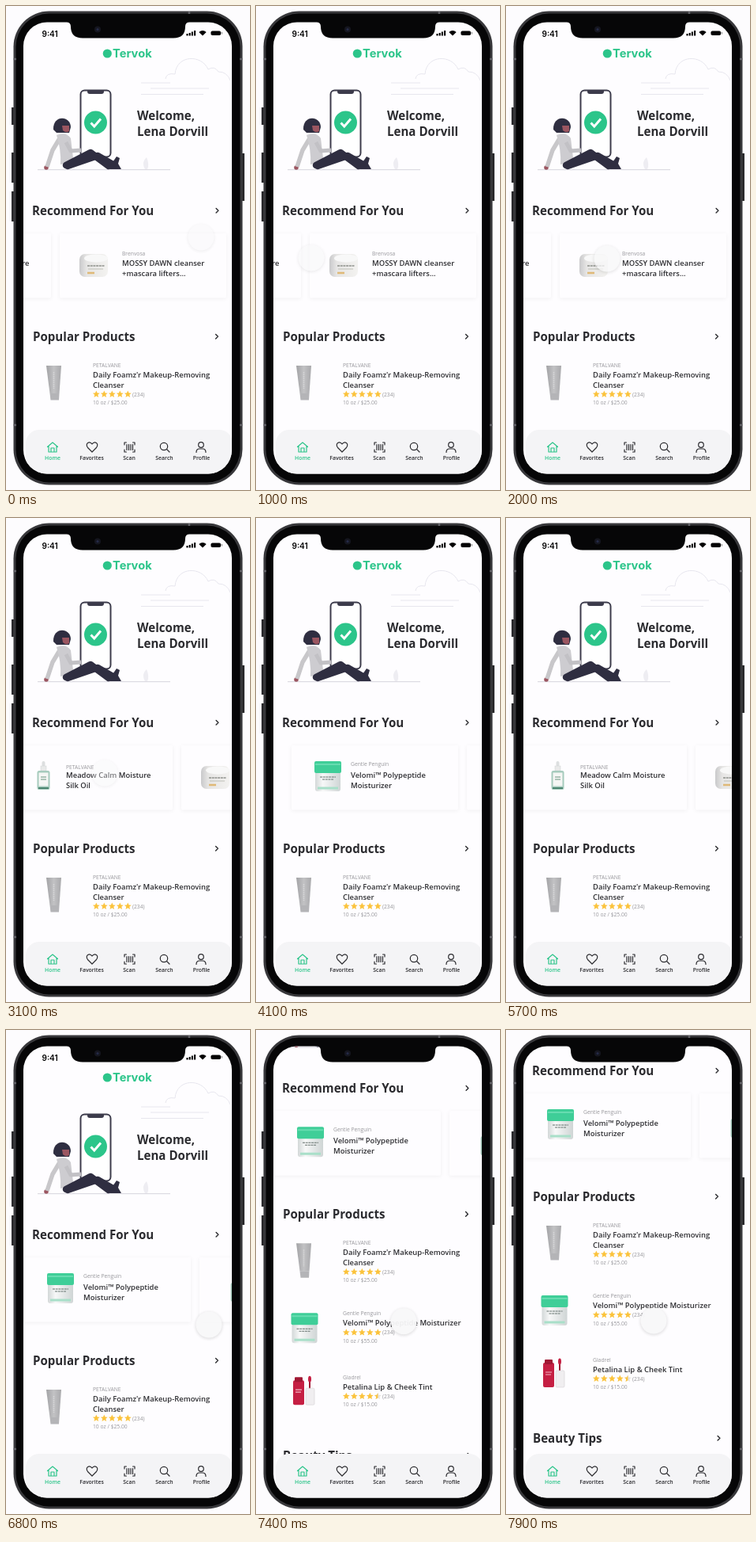
An HTML page that plays this animation: 309 px wide and 611 px high, repeating every 8000 ms.

```html
<!DOCTYPE html>
<html lang="en">
<head>
<meta charset="utf-8">
<title>Beauty shop app</title>
<style>
  html, body { margin: 0; height: 100%; overflow: hidden; background: #fdfcfe; }
  svg { display: block; width: 100vw; height: 100vh; font-family: "Open Sans", sans-serif; }
  .h { font-size: 15.1px; font-weight: 700; fill: #2b2b2f; }
  .title { font-size: 9.45px; font-weight: 600; fill: #2e2e32; }
  .small { font-size: 6.75px; fill: #98989c; }
  .label { font-size: 6.9px; font-weight: 600; text-anchor: middle; fill: #2b2b2f; }
  .line { fill: none; stroke: #2b2b2f; stroke-width: 1.2; stroke-linecap: round; stroke-linejoin: round; }
  .card { fill: #fefdff; filter: drop-shadow(0 1.5px 2.5px rgba(0,0,0,.055)); }
  #touch { filter: drop-shadow(0 1.5px 2px rgba(0,0,0,.16)); }
</style>
</head>
<body>
<svg viewBox="0 0 309 611">
  <defs>
    <clipPath id="screen"><rect x="22" y="20.5" width="264" height="570" rx="30"/></clipPath>
    <clipPath id="half"><rect x="-5" y="-5" width="5" height="10"/></clipPath>
    <linearGradient id="metal">
      <stop offset="0" stop-color="#a2a2a5"/><stop offset=".5" stop-color="#c2c2c4"/><stop offset="1" stop-color="#a9a9ac"/>
    </linearGradient>
    <linearGradient id="glass">
      <stop offset="0" stop-color="#d3d8d8"/><stop offset=".3" stop-color="#f7f8f8"/><stop offset="1" stop-color="#cfd5d5"/>
    </linearGradient>
    <linearGradient id="cream">
      <stop offset="0" stop-color="#c9c9cb"/><stop offset=".25" stop-color="#e6e5e4"/><stop offset="1" stop-color="#f3f2f0"/>
    </linearGradient>
    <path id="star" d="M0-4.5 1.3-1.5 4.4-1.3 2 .8 2.8 3.9 0 2.2-2.8 3.9-2 .8-4.4-1.3-1.3-1.5Z"/>
    <path id="chevron" class="line" style="stroke-width:1.4" d="M-1.4-2.8 1.4 0-1.4 2.8"/>

    <g id="tube">
      <path d="M0 0H19L16.5 35H4.5Z" fill="url(#metal)"/>
      <path d="M4.5 35H16.5L16 43.5H5.500Z" fill="#b4b4b7"/>
      <path d="M9.500 8V29" stroke="#d8d8da" stroke-width="1.5" stroke-dasharray="1.5 1"/>
    </g>
    <g id="jar">
      <rect x="1" y="13" width="32" height="25" rx="3" fill="url(#glass)"/>
      <rect y="0" width="34" height="15" rx="2" fill="#3fce98"/>
      <path d="M1 4H33" stroke="#66dcb0" stroke-width="2"/>
      <path d="M7 20H27M10 23H24" stroke="#65726e" stroke-width="1.1" stroke-dasharray="3 .7"/>
      <path d="M4 34H30" stroke="#a9dfc9" stroke-width="3"/>
    </g>
    <g id="dropper">
      <rect x="6.500" y="0" width="4" height="7" rx="2" fill="#dddfe0"/>
      <rect x="5" y="6" width="7" height="6" fill="#e9eaea" stroke="#ced2d2" stroke-width=".5"/>
      <rect x=".5" y="12" width="16" height="24" rx="2.500" fill="#a6cbbd"/>
      <rect x="2.500" y="14.500" width="12" height="17" fill="#f5f6f4"/>
      <path d="M5 20H12M5 23H12" stroke="#69937f"/>
      <path d="M2 34H15" stroke="#4c8570" stroke-width="2"/>
    </g>
    <g id="tub">
      <rect y="1" width="36" height="29" rx="7" fill="url(#cream)"/>
      <ellipse cx="21" cy="6.500" rx="15" ry="5" fill="#f8f8f8"/>
      <path d="M10 16H32" stroke="#8f918c" stroke-width="1.6" stroke-dasharray="3 .7"/>
      <path d="M11 20H30" stroke="#bfc0b8"/>
      <path d="M10 25H19" stroke="#dfb977" stroke-width="2.500"/>
    </g>
    <g id="tint">
      <rect x="1" y="5" width="14" height="31" rx="2" fill="#c51f43"/>
      <rect x="3" y="1" width="10" height="6" rx="1" fill="#a01834"/>
      <path d="M4 17H12M4 20H11" stroke="#f2b8c4" stroke-width="1.2"/>
      <path d="M22 1V18" stroke="#a01834" stroke-width="2"/>
      <ellipse cx="22" cy="3.5" rx="2" ry="4" fill="#c51f43"/>
      <rect x="17" y="15" width="11" height="21" rx="1.5" fill="#f0eef0" stroke="#d3d0d4" stroke-width=".6"/>
    </g>
  </defs>

  <!-- phone body -->
  <path d="M8.500 128V150M8.500 185V223M8.500 234V272M300.500 186V246" stroke="#29292c" stroke-width="3"/>
  <rect x="9.500" y="6.500" width="290" height="598" rx="45" fill="#38383b"/>
  <rect x="12.500" y="9.500" width="284" height="592" rx="42" fill="#060607"/>
  <path d="M9.500 67H13M9.500 529H13M296 67H299.500M296 529H299.500M232 7V10" stroke="#626267" stroke-width="2.5"/>

  <g clip-path="url(#screen)">
    <rect x="20" y="20" width="268" height="572" fill="#fefdff"/>
    <g id="page">
      <!-- status bar -->
      <text x="45.5" y="39.3" font-family="Inter, sans-serif" font-size="10" font-weight="600">9:41</text>
      <path d="M229.5 37.5V35M232.7 37.5V34M235.9 37.5V32.500M239.1 37.5V31" stroke="#000" stroke-width="2.1"/>
      <path d="M249 37.5 244.300 33Q249 29 253.700 33Z"/>
      <rect x="259.5" y="31.500" width="12.5" height="5.500" rx="1.800"/><path d="M273.3 33V35.5" stroke="#777"/>

      <circle cx="128.3" cy="60" r="5.6" fill="#2cc58a"/>
      <text x="135" y="65" font-family="Inter, sans-serif" font-size="14.7" font-weight="700" fill="#2cc58a">Tervok</text>

      <!-- clouds -->
      <path d="M202 92Q203 84 214 86C216 61 248 61 256 80Q264 75 269 83Q280 83 284 94M171 97H208M183 104H257M171 111.5H250" fill="none" stroke="#e7e6ee"/>

      <!-- welcome drawing -->
      <path d="M40 206.7H208" stroke="#d5d4dc"/>
      <path d="M176 206Q171 197 178 191Q182 200 179 206Z" fill="#eeedf2"/>
      <rect x="94.5" y="106.5" width="38" height="84" rx="5" fill="#fff" stroke="#3c3b4b" stroke-width="2"/>
      <path d="M103 106H124V108Q124 111 121 111H106Q103 111 103 108Z" fill="#3c3b4b"/>
      <circle cx="113.5" cy="147" r="14.5" fill="#2cc58a"/>
      <path d="M107.5 147.5 111.8 152 120 142.5" fill="none" stroke="#fff" stroke-width="3"/>
      <circle cx="51" cy="204" r="2.8" fill="#9b5661"/>
      <path d="M68 167 59 182 52 203" fill="none" stroke="#c8c7ca" stroke-width="5.5"/>
      <path d="M64 163Q76 158 82 167L85 192Q78 199 69 200Q70 181 64 163Z" fill="#cdccd0"/>
      <path d="M76 172 82 183 95 182" fill="none" stroke="#c2c1c5" stroke-width="5" stroke-linejoin="round"/>
      <path d="M76 201 107 185 130 202M78 202 116 189 137 201" fill="none" stroke="#2f2e41" stroke-width="8.500" stroke-linejoin="round" stroke-linecap="round"/>
      <path d="M131 203 140 190 144 192 142 199 146 206H132Z" fill="#2f2e41"/>
      <path d="M60 156C59 137 82 138 82 153L80 160H64Z" fill="#2f2e41"/>
      <path d="M71 151H80V158Q76 161 72 157Z" fill="#9b5661"/>

      <text class="h" x="166" y="144">Welcome,</text>
      <text class="h" x="166" y="164">Lena Dorvill</text>
      <g id="sections"></g>
      <g id="strip"></g>
      <g id="list"></g>
    </g>

    <!-- tab bar -->
    <rect x="25" y="535" width="262" height="75" rx="17" fill="#f4f4f6"/>
    <g class="line">
      <path stroke="#2cc58a" d="M52.500 556.500 59 551 65.500 556.500M54 556V563H64V556M57 563V558H61V563"/>
      <path d="M109 563 103.5 557.5C99.5 552 106 548.5 109 553C112 548.5 118.5 552 114.5 557.5Z"/>
      <path d="M150 554V551H152.5M160.5 551H163V554M163 560V563H160.5M152.5 563H150V560M153 553.5V560.5M155.5 553.5V560.5M158 553.5V560.5M160.5 553.5V560.5"/>
      <circle cx="200" cy="556" r="4.7"/><path d="M203.5 559.5 207 563"/>
      <circle cx="247" cy="554" r="3.3"/><path d="M241 563.5Q241 559 245 559H249Q253 559 253 563.5"/>
    </g>
    <g id="tabs"></g>
  </g>

  <path d="M77 20H232Q227 21 227 26Q227 40.500 212 40.500H97Q82 40.500 82 26Q82 21 77 20Z" fill="#060607"/>
  <circle cx="116" cy="29.5" r="4" fill="#15161f"/><circle cx="116" cy="29.5" r="1.5" fill="#252b48"/>
  <circle id="touch" r="16.5" fill="#f8f8f9"/>
</svg>

<script>
const $ = id => document.getElementById(id);
const text = (cls, x, y, s, extra = '') => `<text class="${cls}" x="${x}" y="${y}" ${extra}>${s}</text>`;
const use = (id, x, y, extra = '') => `<use href="#${id}" transform="translate(${x} ${y})" ${extra}/>`;

const section = (x, y, name, arrowX) => text('h', x, y, name) + use('chevron', arrowX, y - 5.8);
$('sections').innerHTML =
  section(33, 264, 'Recommend For You', 267.5) +
  section(34, 423, 'Popular Products', 267) +
  section(34, 728, 'Beauty Tips', 269.5);

const PITCH = 222;
const cards = [
  { art: ['jar', 29, 307], textX: 75, brand: ['Gentle Penguin', 313], lines: ['Velomi™ Polypeptide', 'Moisturizer'] },
  { art: ['dropper', 39, 307], textX: 76, brand: ['PETALVANE', 317], lines: ['Meadow Calm Moisture', 'Silk Oil'] },
  { art: ['tub', 25, 312], textX: 79, brand: ['Brenvosa', 315], lines: ['MOSSY DAWN cleanser', '+mascara lifters...'] },
];
$('strip').innerHTML = cards.map((c, i) => `<g transform="translate(${i * PITCH})">
  <rect class="card" y="287" width="211" height="81.5" rx="2"/>
  ${use(...c.art)}${text('small', c.textX, c.brand[1], c.brand[0])}
  ${c.lines.map((s, n) => text('title', c.textX, 328 + 13 * n, s)).join('')}</g>`).join('');

const stars = (y, count) => [0, 1, 2, 3, 4].map(i => {
  const x = 114.3 + 10 * i;
  return i < count - .5
    ? use('star', x, y, 'fill="#fbc33c"')
    : use('star', x, y, 'fill="#e3e1dc"') + use('star', x, y, 'fill="#fbc33c" clip-path="url(#half)"');
}).join('');

// y is the baseline of the brand line
const product = (art, y, brand, lines, price, count) => {
  const end = y + 13 * lines.length;
  return use(...art) + text('small', 110, y, brand) +
    lines.map((s, n) => text('title', 110, y + 13 + 13 * n, s)).join('') +
    stars(end + 8.5, count) + text('small', 160, end + 11, '(234)') +
    text('small', 110, end + 21.5, `10 oz / $${price}.00`);
};
$('list').innerHTML =
  product(['tube', 51, 454], 455.5, 'PETALVANE', ["Daily Foamz'r Makeup-Removing", 'Cleanser'], 25, 5) +
  product(['jar', 44.5, 542], 545, 'Gentle Penguin', ['Velomi™ Polypeptide Moisturizer'], 55, 5) +
  product(['tint', 46, 622], 625.5, 'Gladrel', ['Petalina Lip &amp; Cheek Tint'], 15, 4.5);

$('tabs').innerHTML = [[59, 'Home'], [108.5, 'Favorites'], [156, 'Scan'], [200.5, 'Search'], [247.5, 'Profile']]
  .map(([x, s], i) => text('label', x, 573, s, i ? '' : 'style="fill:#2cc58a"')).join('');

const smooth = u => u * u * (3 - 2 * u);
const out = u => 1 - (1 - u) ** 3;
const jump = () => 1;

// keys are [time, value, easing into this key]
function track(keys, t) {
  const i = keys.findIndex(k => k[0] > t);
  if (i < 0) return keys[keys.length - 1][1];
  if (i === 0) return keys[0][1];
  const [t0, a] = keys[i - 1], [t1, b, ease = smooth] = keys[i];
  return a + (b - a) * ease((t - t0) / (t1 - t0));
}

const stripX = [[0, -376], [2000, -376], [2650, -222], [3110, -222], [4100, 45, out],
  [4500, 45], [5350, -204], [5850, -204], [6400, 23]];
const pageY = [[0, 0], [6960, 0], [7800, -207, out]];
const touchX = [[0, 247], [50, 247], [850, 70], [1200, 70], [1300, 128, jump], [2000, 128], [2650, 282],
  [3020, 125], [3110, 125], [3560, 284], [4000, 284], [4200, 274, jump], [4500, 274], [5350, 25],
  [5650, 25], [5700, 57, jump], [5850, 57], [6400, 284], [6500, 284], [6800, 257], [6960, 205], [7500, 187, out]];
const touchY = [[0, 292], [850, 312], [1300, 318, jump], [2650, 320], [3100, 322], [6500, 325],
  [6800, 372], [6960, 480], [7500, 367, out]];
const touchAlpha = [[0, .45], [120, .9], [850, .9], [1200, 0], [1700, 0], [2100, .9], [2650, .9], [2850, 0],
  [3020, 0], [3200, .9], [3560, .9], [3900, 0], [4300, 0], [4500, .9], [5350, .9], [5600, 0],
  [5720, 0], [5860, .95]];

function frame() {
  const t = performance.now() % 8000;
  $('strip').setAttribute('transform', `translate(${track(stripX, t)})`);
  $('page').setAttribute('transform', `translate(0 ${track(pageY, t)})`);
  $('touch').setAttribute('transform', `translate(${track(touchX, t)} ${track(touchY, t)})`);
  $('touch').setAttribute('opacity', track(touchAlpha, t));
  requestAnimationFrame(frame);
}
frame();
</script>
</body>
</html>
```
